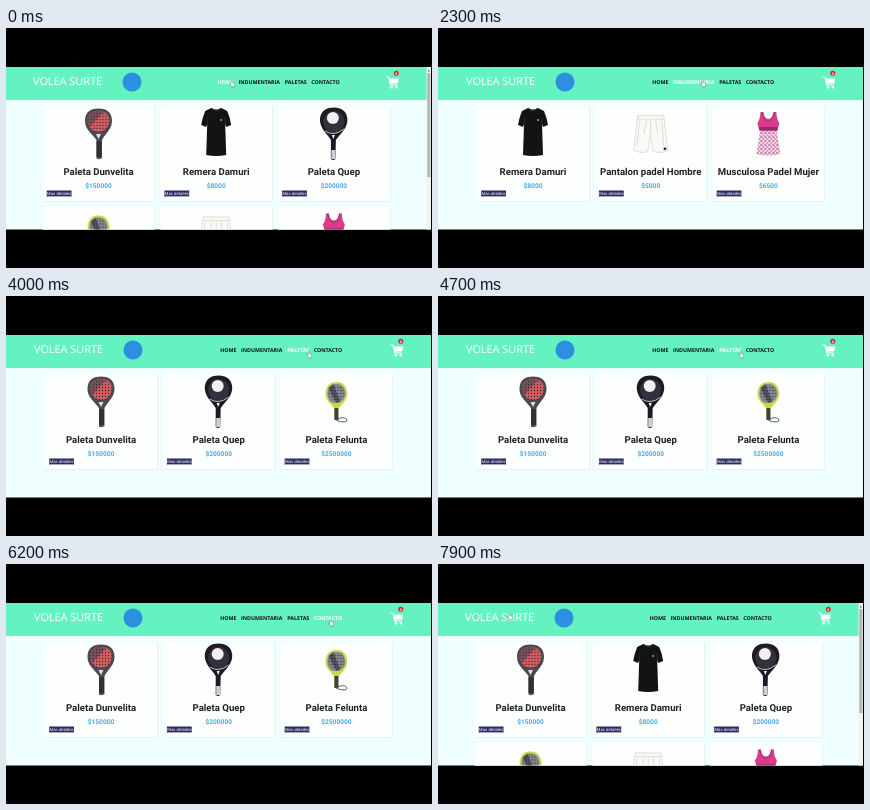
An HTML page that plays this animation: 426 by 240 pixels, repeating every 8000 ms.

```html
<!DOCTYPE html>
<html lang="es">
<meta charset="utf-8">
<title>Tienda deportiva</title>
<style>
  html, body { margin: 0; width: 100%; height: 100%; overflow: hidden; background: #000; }
  svg { display: block; width: 100vw; height: 100vh; }
  text { text-rendering: geometricPrecision; }

  .brand { font: 10.9px "Open Sans", "Noto Sans", sans-serif; fill: #fff; }
  .nav text { font: 700 5.3px "Open Sans", "Noto Sans", sans-serif; fill: #111; animation: 8s linear infinite; }
  .title { font: 700 9.6px Roboto, sans-serif; fill: #222; text-anchor: middle; }
  .price { font: 700 6.6px Roboto, sans-serif; fill: #43aeea; text-anchor: middle; }
  .more { font: 4.3px "Liberation Sans", Arial, sans-serif; fill: #fff; text-decoration: underline; }
  .count { font: 700 3.6px Roboto, sans-serif; fill: #fff; text-anchor: middle; }

  /* Without the scrollbar the layout moves right. */
  .shift { animation: shift 8s step-end infinite; }
  @keyframes shift {
    0%, 92.5% { transform: translateX(0); }
    23.75% { transform: translateX(var(--dx)); }
  }

  .page { animation: 8s step-end infinite; }
  #home { animation-name: home; }
  #clothes { animation-name: clothes; }
  #rackets { animation-name: rackets; }
  @keyframes home { 0%, 92.5% { visibility: visible; } 23.75% { visibility: hidden; } }
  @keyframes clothes { 0%, 48.75% { visibility: hidden; } 23.75% { visibility: visible; } }
  @keyframes rackets { 0%, 92.5% { visibility: hidden; } 48.75% { visibility: visible; } }

  .nav .n1 { animation-name: link1; }
  .nav .n2 { animation-name: link2; }
  .nav .n3 { animation-name: link3; }
  .nav .n4 { animation-name: link4; }
  @keyframes link1 { 0%, 21% { fill: #fff; } 24%, 100% { fill: #111; } }
  @keyframes link2 { 0%, 21% { fill: #111; } 24%, 38% { fill: #fff; } 42.5% { fill: #a6ebca; } 46%, 100% { fill: #111; } }
  @keyframes link3 { 0%, 45% { fill: #111; } 49%, 67% { fill: #fff; } 70%, 100% { fill: #111; } }
  @keyframes link4 { 0%, 69% { fill: #111; } 72%, 82% { fill: #fff; } 85%, 100% { fill: #111; } }

  .cursor { animation: move 8s ease-in-out infinite; }
  @keyframes move {
    0%, 8% { transform: translate(225px, 52.5px); }
    16%, 18% { transform: translate(245px, 56.5px); }
    24%, 34% { transform: translate(264px, 52.5px); }
    42.5% { transform: translate(288.5px, 51.5px); }
    48%, 64% { transform: translate(302px, 55.5px); }
    72%, 81% { transform: translate(324px, 55.5px); }
    91%, 100% { transform: translate(71px, 49.5px); }
  }
</style>
<body>
<svg viewBox="0 0 426 240" preserveAspectRatio="none">
  <defs>
    <clipPath id="view"><rect y="39" width="425" height="162.5"/></clipPath>
    <pattern id="holes" width="3" height="3" patternUnits="userSpaceOnUse">
      <circle cx="1.5" cy="1.5" r=".65" fill="#33282e"/>
    </pattern>
    <pattern id="spots" width="4" height="4" patternUnits="userSpaceOnUse">
      <circle cx="1" cy="1" r=".95" fill="#a44a91"/>
      <circle cx="3" cy="3" r=".95" fill="#d96a9d"/>
    </pattern>

    <!-- Products: x is measured from the middle of the card. -->
    <g id="redRacket">
      <path d="M-13.5 92C-13 83-7 80.5 0 80.5S13 83 13.5 92C14 101 7 105 3.5 112V130Q1 132-2 130.5V112C-7 105-14 101-13.5 92Z" fill="#4b4a50"/>
      <path d="M-11 92C-10 85-6 83 0 83S10 85 11 92C11 99 6 104 0 104S-11 99-11 92Z" fill="#d35c60"/>
      <path d="M-11 92C-10 85-6 83 0 83L5 84-9 99Z" fill="#77505a"/>
      <ellipse cy="94" rx="11" ry="11" fill="url(#holes)"/>
      <path d="M-2.5 106L0 111 2.5 106Z" fill="#e6e2e2"/>
      <path d="M-2 113H3V129H-2Z" fill="#303036"/>
    </g>
    <g id="blackRacket">
      <path d="M-14 91C-13 82-7 79.5 0 79.5S13 83 13.5 91C14 100 7 105 2 112L1.5 131Q-.5 133-3 131V112C-7 105-14 101-14 91Z" fill="#1d1a24"/>
      <ellipse cy="94" rx="10.5" ry="11" fill="#34303d"/>
      <ellipse cy="94" rx="10.5" ry="11" fill="url(#holes)"/>
      <circle cx="-1" cy="90" r="6" fill="#f0eff2"/>
      <path d="M-9 103Q0 109 10 101" fill="none" stroke="#c6bfd0"/>
      <path d="M-2 107L-.5 111 1 107Z" fill="#fff"/>
      <path d="M-2.5 122H1.5V131H-2.5Z" fill="#d6cbd2"/>
    </g>
    <g id="limeRacket">
      <path d="M-11 97C-10 88-5 86 0 86S10 88 11 97C11 105 5 108 2 113V124H-2V113C-5 108-11 105-11 97Z" fill="#c8d94b"/>
      <path d="M-9 97C-8 90-5 88 0 88S8 90 9 97C9 104 5 106 0 107S-9 104-9 97Z" fill="#83898f"/>
      <path d="M-8 92L-3 88 4 106 0 107Z" fill="#4d535f"/>
      <ellipse cy="97" rx="8" ry="8" fill="url(#holes)"/>
      <path d="M-2 112H2V124H-2Z" fill="#3c4148"/>
      <path d="M0 124C3 121 10 121 10.5 124S3 126 0 124" fill="none" stroke="#55595c"/>
    </g>
    <g id="shirt">
      <path d="M-5 80Q0 83 5 80L11 83Q14 90 15 97L10 99 9 96 10 127Q0 129-10 127L-9 96-10 99-15 97Q-14 90-11 83Z" fill="#111315"/>
      <path d="M-4.5 80Q0 85 4.5 80" fill="none" stroke="#45484a" stroke-width=".8"/>
      <path d="M-9 96L-8 89M9 96L8 89" stroke="#35383a" stroke-width=".6"/>
      <circle cx="5" cy="92" r="1" fill="#a4ad9b"/>
    </g>
    <g id="shorts" stroke="#d5d1c8" stroke-width=".7">
      <path d="M-13 87.5H13L17 123Q9 126 2 123.5L0 105-3 123.5Q-10 126-17 122Z" fill="#faf9f5"/>
      <path d="M-13 91H13M0 92V105M-11 93L-14 119M11 93L13 118M-4 92L-7 106M5 92L7 106" fill="none"/>
      <rect x="13" y="119.5" width="2.5" height="2.5" fill="#343640" stroke="none"/>
    </g>
    <g id="dress">
      <path d="M-8 101L-12 126Q0 129 12 126L8 101Z" fill="#f5dfe9"/>
      <path d="M-8 101L-12 126Q0 129 12 126L8 101Z" fill="url(#spots)"/>
      <path d="M-8 84H-5Q-4 91 0 91T5 84H8Q8 91 11 95L9 103H-9L-11 95Q-8 91-8 84Z" fill="#dc3b87"/>
      <path d="M-6 84Q-5 93 0 93T6 84" fill="none" stroke="#8e3d76"/>
      <path d="M-9 99H9V102H-9Z" fill="#7e3570"/>
    </g>
  </defs>

  <rect width="426" height="240"/>
  <g clip-path="url(#view)">
    <rect y="39" width="425" height="163" fill="#efffff"/>
    <g class="page" id="home"></g>
    <g class="page" id="clothes"></g>
    <g class="page" id="rackets"></g>

    <rect y="39" width="425" height="33" fill="#64f2c0"/>
    <g class="page" style="animation-name: home">
      <rect x="420.5" y="39" width="4.5" height="163" fill="#f1f3f1"/>
      <path d="M421.5 43.5L422.8 41.5 424.1 43.5Z" fill="#777"/>
      <rect x="421.2" y="45" width="3.2" height="104" fill="#b5b8b5"/>
    </g>
    <g class="shift" style="--dx: 1px">
      <text class="brand" x="27" y="57">VOLEA SURTE</text>
      <circle cx="126" cy="54" r="9.5" fill="#2d8fe0"/>
    </g>
    <g class="nav shift" style="--dx: 2.5px">
      <text class="n1" x="211.8" y="55.6">HOME</text>
      <text class="n2" x="232.5" y="55.6">INDUMENTARIA</text>
      <text class="n3" x="278.8" y="55.6">PALETAS</text>
      <text class="n4" x="305.2" y="55.6">CONTACTO</text>
    </g>
    <g class="shift" style="--dx: 4.5px">
      <path d="M380 49H382.5L384.5 57H391.5" fill="none" stroke="#fff" stroke-width="1.2"/>
      <path d="M383 50.5H393L391.5 55.5H384.2Z" fill="#fff"/>
      <circle cx="385.5" cy="59.3" r="1.3" fill="#fff"/>
      <circle cx="390.5" cy="59.3" r="1.3" fill="#fff"/>
      <circle cx="390.3" cy="45.2" r="2.5" fill="#d8232f"/>
      <text class="count" x="390.3" y="46.5">0</text>
    </g>
    <path class="cursor" d="M0 0Q.8-.8 1.4 0V2.2L3.7 2.8Q4.2 4.5 3.3 6H.2L-1.5 3.5Q-1.2 2.8 0 3.5Z"
          fill="#fff" stroke="#333" stroke-width=".35"/>
  </g>
</svg>

<script>
  const goods = {
    redRacket: ["Paleta Dunvelita", "$150000"],
    blackRacket: ["Paleta Quep", "$200000"],
    limeRacket: ["Paleta Felunta", "$2500000"],
    shirt: ["Remera Damuri", "$8000"],
    shorts: ["Pantalon padel Hombre", "$5000"],
    dress: ["Musculosa Padel Mujer", "$6500"]
  };

  function card(item, i, left) {
    const [title, price] = goods[item];
    const x = left + (i % 3) * 117.7;
    const y = Math.floor(i / 3) * 101.5;
    return `<g transform="translate(${x} ${y})">
      <rect x="-55.7" y="78.5" width="112.4" height="95.5" rx="1" fill="#dceeee"/>
      <rect x="-56" y="78" width="112" height="95.2" rx="1" fill="#fdfefe"/>
      <use href="#${item}"/>
      <text class="title" y="147">${title}</text>
      <text class="price" y="160">${price}</text>
      <rect x="-51.8" y="162.5" width="24.8" height="6.2" fill="#292b61"/>
      <text class="more" x="-51.4" y="167.2">Mas detalles</text>
    </g>`;
  }

  function fill(id, left, items) {
    document.getElementById(id).innerHTML =
      items.map((item, i) => card(item, i, left)).join("");
  }

  fill("home", 92.5, ["redRacket", "shirt", "blackRacket", "limeRacket", "shorts", "dress"]);
  fill("clothes", 95, ["shirt", "shorts", "dress"]);
  fill("rackets", 95, ["redRacket", "blackRacket", "limeRacket"]);
</script>
</body>
</html>
```
